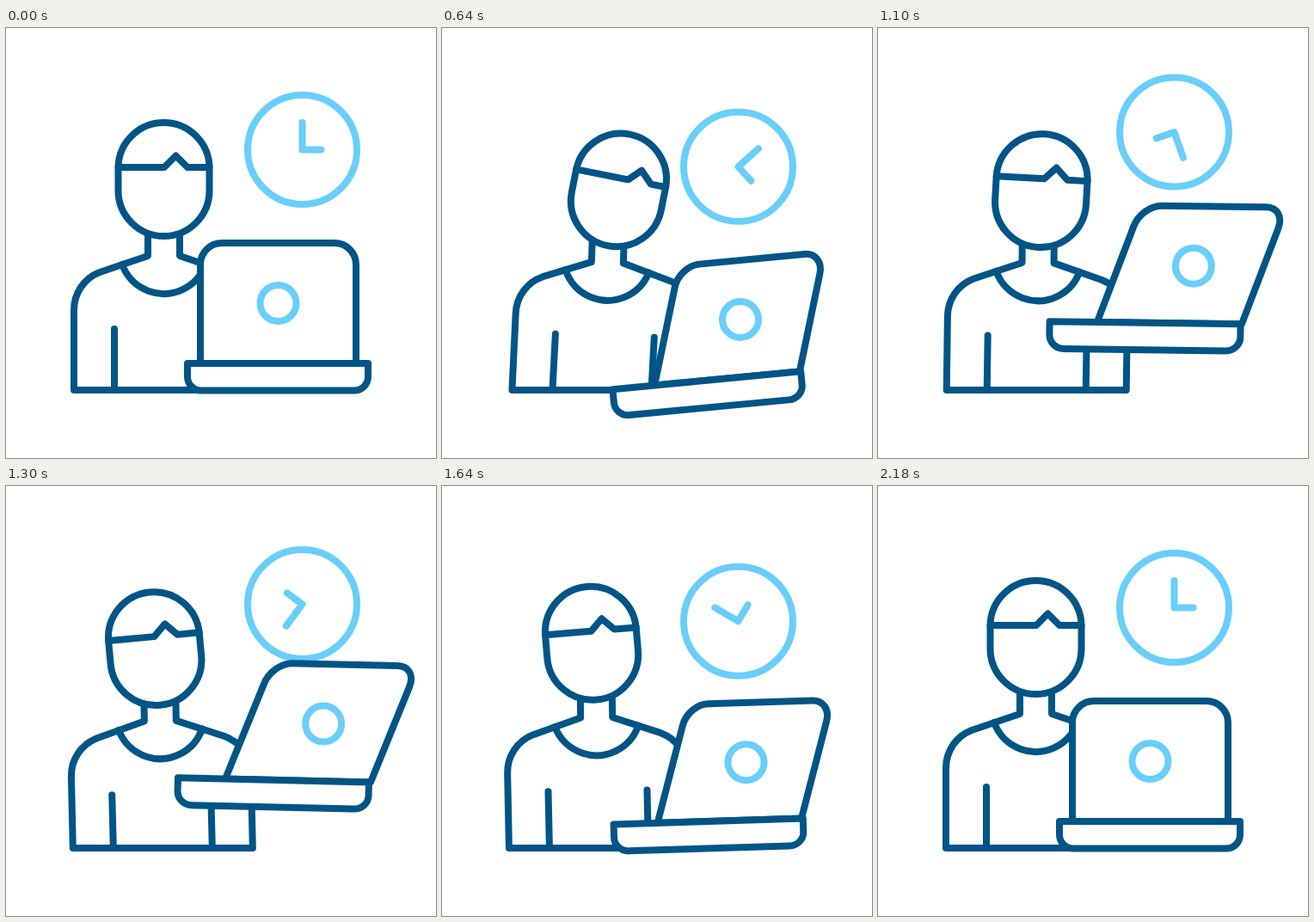
An HTML page with a canvas for the animation above (2.5 s loop, 500 px wide and 500 px high).

```html
<!DOCTYPE html>
<html lang="en">
<head>
<meta charset="utf-8">
<title>Working hours</title>
<style>
  html, body { margin: 0; width: 100%; height: 100%; overflow: hidden; background: #fff; }
  canvas { display: block; width: 500px; height: 500px; }
</style>
</head>
<body>
<canvas id="stage" width="500" height="500"></canvas>
<script>
const ctx = document.getElementById('stage').getContext('2d');
const LOOP = 2500, START = 160, END = 2180;
const DARK = '#005586', LIGHT = '#69cefa';

// Smooth curve through [time, value] keys, flat at every peak and at both ends.
function track(...keys) {
  const slope = i => keys[i] && keys[i + 1]
    ? (keys[i + 1][1] - keys[i][1]) / (keys[i + 1][0] - keys[i][0]) : 0;
  const tangent = i => {
    const a = slope(i - 1), b = slope(i);
    return a * b > 0 ? 2 * a * b / (a + b) : 0;
  };
  return t => {
    if (t <= keys[0][0]) return keys[0][1];
    const i = keys.findIndex(k => k[0] > t) - 1;
    if (i < 0) return keys[keys.length - 1][1];
    const [[t0, v0], [t1, v1]] = keys.slice(i, i + 2);
    const span = t1 - t0, s = (t - t0) / span, r = 1 - s;
    return v0 * r * r * (1 + 2 * s) + v1 * s * s * (3 - 2 * s)
      + span * s * r * (tangent(i) * r - tangent(i + 1) * s);
  };
}

const clockY = track([START, 141.5], [670, 161.5], [1110, 121], [1530, 159], [2100, 141.5]);
const laptopY = track([START, 390], [620, 410], [1200, 337], [1790, 400], [END, 390]);
const laptopTilt = track([START, 0], [620, -.096], [1150, .018], [1500, .026], [1790, -.093], [END, 0]);
const lidTurn = track([START, 0], [640, .52], [1280, 1], [END, 0]);
const sway = track([START, 0], [770, 12.7], [1500, -9.3], [1790, 0]); // degrees
const sink = track([START, 0], [720, 8.2], [1500, 8.2], [1790, 0]);

const reset = () => ctx.setTransform(1, 0, 0, 1, 0, 0);

// Outlines keep an even weight because the transform only shapes the path.
function paint(color, fill) {
  reset();
  if (fill) {
    ctx.fillStyle = '#fff';
    ctx.fill();
  }
  ctx.strokeStyle = color;
  ctx.stroke();
}

function line(...points) {
  points.forEach(([x, y], i) => i ? ctx.lineTo(x, y) : ctx.moveTo(x, y));
}

function ring(x, y, r) {
  ctx.beginPath();
  ctx.arc(x, y, r, 0, 2 * Math.PI);
  paint(LIGHT);
}

function place(x, y, degrees) {
  reset();
  ctx.translate(x, y);
  ctx.rotate(degrees * Math.PI / 180);
}

function drawClock(t) {
  const y = clockY(t);
  const s = Math.min(1, Math.max(0, (t - START) / (END - START)));
  ring(344.5, y, 63.5);
  place(344.5, y, 180 * (1 - Math.cos(Math.PI * s)));
  ctx.beginPath();
  line([0, -31.5], [0, 0], [22, 0]);
  paint(LIGHT);
}

// The shoulders lean while the lower edge stays on the ground.
function drawBody(t) {
  const lean = sway(t);
  const upper = () => {
    place(183.5 + lean * .52, 350 + sink(t), lean * .18);
    ctx.translate(-183.5, -350);
  };
  const foot = x => x + lean * .22;

  ctx.beginPath();
  ctx.moveTo(foot(79), 421);
  upper();
  ctx.lineTo(79, 328);
  ctx.bezierCurveTo(79, 308, 91, 291, 109, 284);
  ctx.lineTo(165, 265);
  ctx.lineTo(165, 235);
  ctx.lineTo(202, 235);
  ctx.lineTo(202, 265);
  ctx.lineTo(258, 284);
  ctx.bezierCurveTo(276, 291, 288, 308, 288, 328);
  reset();
  ctx.lineTo(foot(288), 421);
  ctx.closePath();
  paint(DARK, true);

  ctx.beginPath();
  upper();
  ctx.arc(183.5, 257.5, 51.5, .346, Math.PI - .346);
  for (const x of [126, 241]) {
    upper();
    ctx.moveTo(x, 350);
    reset();
    ctx.lineTo(foot(x), 421);
  }
  paint(DARK);
}

function drawHead(t) {
  const lean = sway(t), hair = Math.max(0, lean) * .7;
  const placeHead = () => place(183.5 + lean * 1.95, 176 + sink(t) * 1.6, lean);
  placeHead();
  ctx.beginPath();
  ctx.roundRect(-53, -66, 106, 132, 53);
  paint(DARK, true);
  placeHead();
  ctx.beginPath();
  line([-53, -14], [hair + .5, -14], [hair + 14, -27.5], [hair + 27.5, -14], [53, -14]);
  paint(DARK);
}

function drawLaptop(t) {
  const tilt = laptopTilt(t), turn = lidTurn(t), swing = Math.sin(turn * Math.PI / 2);
  const left = 211 - 12 * swing + 40 * tilt, right = 421 + 40 * tilt;
  const hinge = x => laptopY(t) + tilt * (x - (left + right) / 2);

  // Draws a panel standing on the hinge line from x0 to x1.
  const panel = (x0, x1, width, skew, stretch, ...box) => {
    const scale = (x1 - x0) / width;
    ctx.setTransform(scale, tilt * scale, skew, stretch, x0, hinge(x0));
    ctx.beginPath();
    ctx.roundRect(...box);
    paint(DARK, true);
  };

  const x0 = 226 + 29 * swing, x1 = 407 + 17 * turn, mid = (x0 + x1) / 2;
  const lean = 55 * turn, height = 140 - 5 * turn * turn;
  panel(x0, x1, 181, -lean / 140, height / 140, 0, -140, 181, 140, [25, 25, 0, 0]);
  ring(mid + lean * .54, hinge(mid) - height / 2 + 1.5 * turn, 21);
  panel(left, right, 210, -tilt, 1, 0, 0, 210, 31.5, [0, 0, 16, 16]);
}

function frame() {
  const t = performance.now() % LOOP;
  reset();
  ctx.fillStyle = '#fff';
  ctx.fillRect(0, 0, 500, 500);
  ctx.lineWidth = 8;
  ctx.lineCap = ctx.lineJoin = 'round';
  drawClock(t);
  drawBody(t);
  drawHead(t);
  drawLaptop(t);
  requestAnimationFrame(frame);
}
frame();
</script>
</body>
</html>
```
